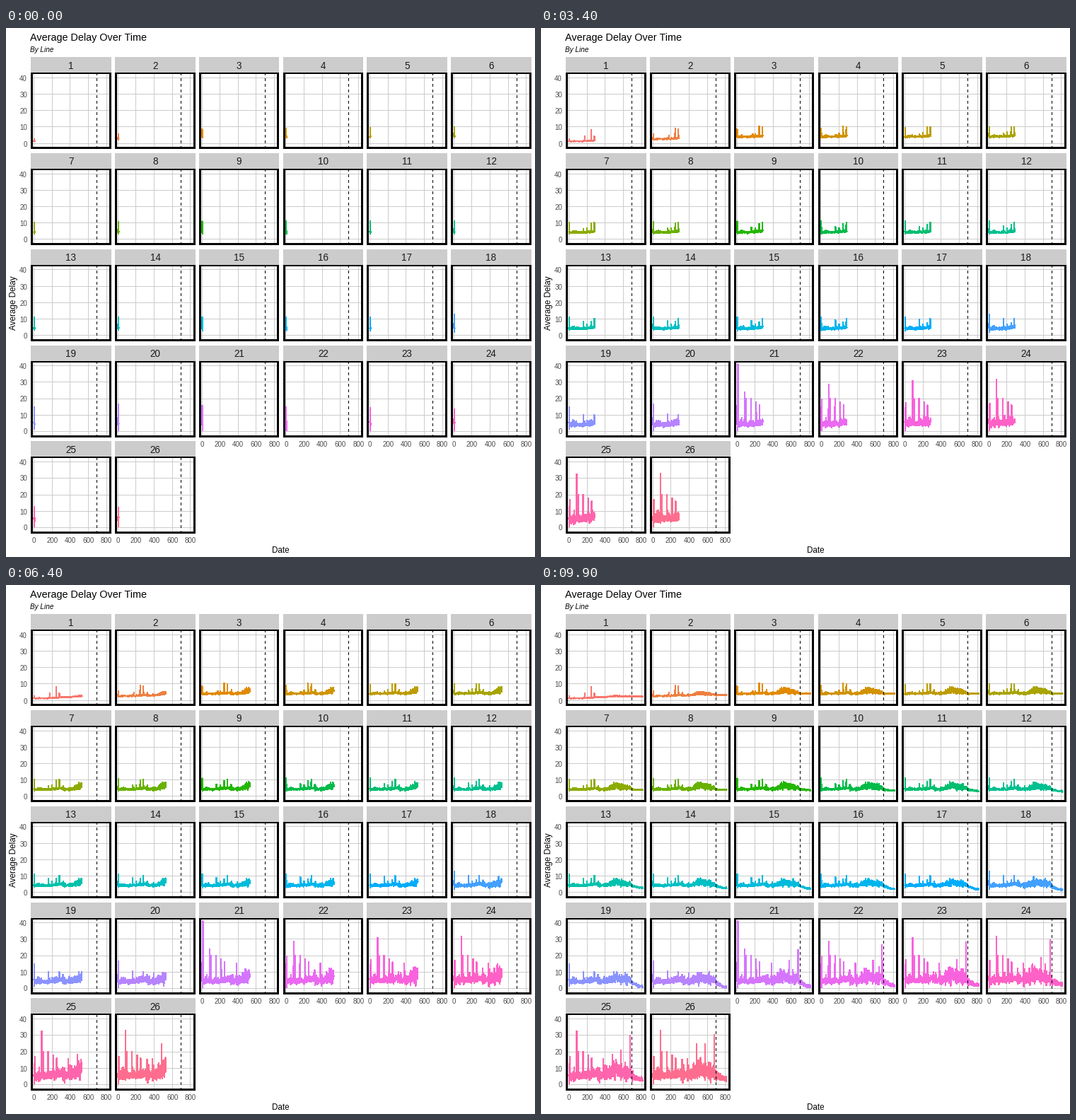
A matplotlib script for the animation above (10 s loop, 748 px wide and 748 px high).

```python
import numpy as np
import matplotlib.pyplot as plt
from matplotlib.animation import FuncAnimation
from matplotlib.collections import LineCollection
from matplotlib.patches import Rectangle

SIZE, DPI, FRAMES = 748, 100, 100
PX = 72 / DPI
COLS, PANELS, LAST_DAY = 6, 26, 812
COL_STEP, ROW_STEP = 118.75, 135.85
X0, Y0, X_UNIT, Y_UNIT = 39.6, 163, 0.128, 2.32
EVENT_DAY = 695
GREY, TICK = "#CCCCCC", "#4D4D4D"
plt.rcParams["font.family"] = "Liberation Sans"

DAYS = np.arange(LAST_DAY + 1)
rng = np.random.default_rng(11)


def hue(i):
    """Evenly spaced HCL hue (chroma 100, luminance 65) as sRGB."""
    h = np.radians(15 + 360 * i / PANELS)
    lum = 65
    y = ((lum + 16) / 116) ** 3
    u = 100 * np.cos(h) / (13 * lum) + 0.1978398
    v = 100 * np.sin(h) / (13 * lum) + 0.4683363
    x = 9 * y * u / (4 * v)
    z = -x / 3 - 5 * y + 3 * y / v
    m = np.array([[3.240479, -1.53715, -0.498535],
                  [-0.969256, 1.875992, 0.041556],
                  [0.055648, -0.204043, 1.057311]])
    rgb = np.clip(m @ [x, y, z], 0, 1)
    return np.where(rgb > 0.0031308, 1.055 * rgb ** (1 / 2.4) - 0.055, 12.92 * rgb)


def by_line(*values):
    """Value that varies smoothly with the line number."""
    return lambda k: np.interp(k, [1, 3, 9, 17, 20, 26], values)


base = by_line(1.2, 3.9, 4.3, 4.1, 4, 5.2)
amp = by_line(0.12, 0.35, 0.5, 0.6, 1.3, 2.3)
hump = by_line(0.5, 3.6, 4.2, 3.4, 4.2, 7)
tail = by_line(2.4, 4.2, 3.8, 2, 0.9, 3.5)
start = by_line(2.7, 8.5, 10.9, 11.2, 16.5, 12)
floor = by_line(1.3, 3.4, 3.4, 3, 0.6, 0.6)


def skewed():
    """Daily noise with a flat lower edge and ragged peaks."""
    noise = rng.gamma(2, 0.6, DAYS.size) - 1 + 0.45 * rng.normal(size=DAYS.size)
    return np.clip(noise, -1.7, 2.8)


def smooth(width):
    wave = np.convolve(rng.normal(size=DAYS.size), np.ones(width) / width, "same")
    return wave / wave.std()


common, slow = skewed(), smooth(21)
envelope = np.clip(0.95 + 0.3 * smooth(41), 0.5, 1.6)
swell = rng.random(DAYS.size) ** 1.6
SUMMER = np.interp(DAYS, [430, 500, 600, 675, 700], [0, 1, 0.75, 0.25, 0])
AUTUMN = np.interp(DAYS, [225, 265, 300, 380], [0, 1, 0.9, 0])
TAIL = np.interp(DAYS, [685, 770], [0, 1])


def spikes(k):
    if k <= 20:
        rises = [(160, 0.33 * k), (175, max(0, 3.5 - 0.6 * k)), (200, min(2.6, k / 2)),
                 (245, 7 - 0.2 * k), (280, min(6, 3 * k)), (325, min(2.4, k))]
        return [(day, base(k) + rise) for day, rise in rises]
    w = k - 21
    return [(10, 17 + 24 * 0.1 ** w), (85, 33 - 9 * 0.5 ** w), (100, 20),
            (155, 20), (212, 18), (250, 16), (380, 15.5),
            (480, 12 + 0.1 * w ** 3), (575, 17 + 0.06 * w ** 3),
            (675, 31 - 7.5 * 0.6 ** w)]


def delays(k):
    noise = envelope * (0.6 * common + 0.5 * skewed())
    level = base(k) + np.interp(DAYS, [180, 500], [0, max(0, 1.6 - 0.5 * k)])
    level += min(1, amp(k)) * (AUTUMN + 0.3 * slow)
    level += hump(k) * SUMMER * (0.12 + 0.9 * swell)
    level += TAIL * (tail(k) - level)
    y = np.maximum(level + amp(k) * noise * (1 - 0.45 * TAIL), 0.1)
    for day, height in spikes(k):
        y[day] = max(y[day], height)
        y[day + 1] += 0.3 * max(0, height - y[day + 1])
    y[:9] = np.clip(y[:9], floor(k), 0.6 * start(k))
    y[3], y[5] = start(k), floor(k)
    return y


fig = plt.figure(figsize=(SIZE / DPI, SIZE / DPI), dpi=DPI, facecolor="white")
ax = fig.add_axes([0, 0, 1, 1])
ax.set(xlim=(0, SIZE), ylim=(SIZE, 0))
ax.axis("off")


def nearest(v):
    return int(v + 0.5)


def mid(v):
    """Centre of the pixel that holds v."""
    return int(v) + 0.5


def label(x, y, s, px, color="black", ha="center", **kw):
    ax.text(x, y, s, fontsize=px * PX, color=color, ha=ha,
            va="center_baseline", **kw)


def box(left, top, right, bottom, **kw):
    return ax.add_patch(Rectangle((left, top), right - left, bottom - top,
                                  snap=False, **kw))


def add_panel(k):
    row, col = divmod(k - 1, COLS)
    dx, dy = COL_STEP * col, ROW_STEP * row
    left, right = nearest(35.25 + dx), nearest(148.8 + dx)
    top, bottom = nearest(63 + dy), nearest(171.2 + dy)
    x0, y0 = X0 + dx, Y0 + dy

    for v in range(0, 801, 200):
        x = mid(x0 + X_UNIT * v)
        grid.append([(x, top), (x, bottom)])
        if k + COLS > PANELS:
            label(x0 + X_UNIT * v, bottom + 9.5, str(v), 9.8, TICK)
    for v in range(0, 41, 10):
        y = mid(y0 - Y_UNIT * v)
        grid.append([(left, y), (right, y)])
        if col == 0:
            label(30, y, str(v), 9.8, TICK, "right")

    frame = box(left + 1.5, top + 0.5, right - 1.5, bottom - 1.5,
                fill=False, ec="black", lw=3 * PX, zorder=5, joinstyle="miter")
    box(left, nearest(41 + dy), right, top, fc=GREY, ec="none", zorder=6)
    label((left + right) / 2, 52 + dy, str(k), 13.5, "#1A1A1A", zorder=7)

    xe = mid(x0 + X_UNIT * EVENT_DAY)
    ax.plot([xe, xe], [bottom, top], color="black", lw=PX, ls=(0, (4, 4)),
            dash_capstyle="butt", snap=False, zorder=4)

    line, = ax.plot([], [], color=hue(k - 1), lw=1.3 * PX, antialiased=False,
                    solid_joinstyle="round", snap=False, zorder=3)
    line.set_clip_path(frame)
    return line, x0 + X_UNIT * DAYS, y0 - Y_UNIT * delays(k)


grid = []
panels = [add_panel(k) for k in range(1, PANELS + 1)]
ax.add_collection(LineCollection(grid, colors=GREY, linewidths=PX,
                                 snap=False, zorder=1))

label(34.5, 12, "Average Delay Over Time", 14.4, ha="left")
label(34.5, 30, "By Line", 10, ha="left", style="italic")
label(388, 737.5, "Date", 11.6)
ax.text(11.5, 388.5, "Average Delay", fontsize=11.7 * PX, rotation=90,
        ha="center", va="center")


def update(i):
    shown = 1 + round(8 + (LAST_DAY - 8) * i / (FRAMES - 1))
    for line, x, y in panels:
        line.set_data(x[:shown], y[:shown])
    return [p[0] for p in panels]


anim = FuncAnimation(fig, update, frames=FRAMES, interval=100,
                     repeat=True, repeat_delay=0)
plt.show()
```
